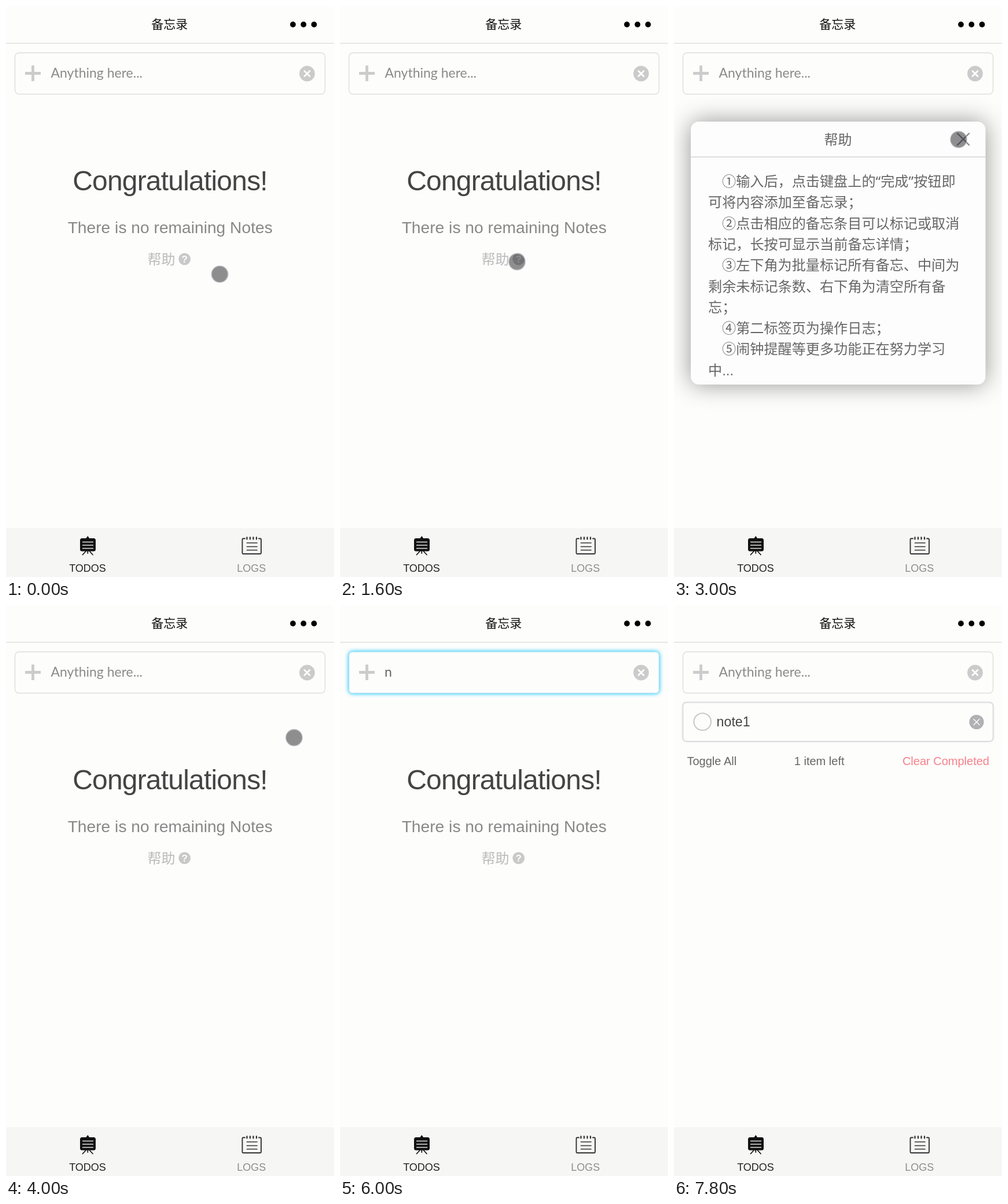
An HTML page for the animation above (8 s loop, 567 by 988 pixels).

```html
<!DOCTYPE html>
<html lang="zh-CN">
<head>
<meta charset="utf-8">
<title>备忘录</title>
<style>
html, body { margin: 0; width: 100%; height: 100%; overflow: hidden; background: #fdfdfc; }
svg { display: block; width: 100vw; height: 100vh; }
text { font-family: "Liberation Sans", Arial, sans-serif; }
.zh { font-family: "Noto Sans CJK SC", "Noto Sans CJK", sans-serif; }
.quote { font-family: "Noto Sans", sans-serif; }
.dots { font-family: "Liberation Sans", sans-serif; }
.field { font: 23px Lato, sans-serif; }
.mid { text-anchor: middle; }
.line { fill: none; stroke-linecap: round; stroke-linejoin: round; }

/* every part shares one 8 s clock with hard steps */
.a { animation: 8s step-end infinite; }
#cursor { animation-name: move; }
#ring { animation-name: ripple; }
#popup { animation-name: popup; }
#glow { animation-name: focus; }
#hint { animation-name: hint; }
#empty { animation-name: empty; }
#list { animation-name: list; }
#caret { animation-name: caret; }
#k1 { animation-name: key1; }
#k2 { animation-name: key2; }
#k3 { animation-name: key3; }
#k4 { animation-name: key4; }

@keyframes move {
  0% { transform: translate(369.5px, 464px); visibility: visible; }
  5% { transform: translate(358px, 459px); }
  7.5% { transform: translate(325px, 448px); }
  10% { transform: translate(304px, 442px); }
  17.5% { transform: translate(306px, 442.5px); }
  25% { transform: translate(330px, 420px); }
  27.5% { transform: translate(477px, 259.5px); }
  30% { transform: translate(509px, 240px); }
  32.5% { transform: translate(505px, 233px); }
  35% { transform: translate(497px, 231px); }
  37.5% { transform: translate(492px, 231px); }
  45% { transform: translate(496px, 230px); }
  47.5% { transform: translate(498px, 229.5px); }
  52.5% { transform: translate(400px, 172px); }
  55% { transform: translate(275.5px, 127.5px); }
  70%, 100% { transform: translate(275.5px, 127.5px); visibility: hidden; }
}
@keyframes ripple {
  0% { opacity: 0; }
  27.5% { opacity: 1; r: 31.5px; transform: translate(305.5px, 441.5px); }
  30% { opacity: .5; r: 39px; }
  32.5% { opacity: 0; }
  52.5% { opacity: 1; r: 31.5px; transform: translate(498px, 229.5px); }
  55% { opacity: .5; r: 39px; }
  57.5% { opacity: 1; r: 31.5px; transform: translate(275.5px, 127.5px); }
  60% { opacity: .5; r: 39px; }
  62.5%, 100% { opacity: 0; }
}
@keyframes popup {
  0% { opacity: 0; }
  22.5% { opacity: .45; }
  25% { opacity: 1; }
  47.5% { opacity: .45; }
  50%, 100% { opacity: 0; }
}
@keyframes focus { 0% { opacity: 0; } 57.5% { opacity: 1; } 97.5%, 100% { opacity: 0; } }
@keyframes hint { 0% { opacity: 1; } 72.5% { opacity: 0; } 95%, 100% { opacity: 1; } }
@keyframes empty { 0% { opacity: 1; } 95%, 100% { opacity: 0; } }
@keyframes list { 0% { opacity: 0; } 95%, 100% { opacity: 1; } }
@keyframes caret {
  0% { opacity: 0; transform: translateX(77px); }
  62.5% { opacity: 1; }
  65% { opacity: 0; }
  67.5% { opacity: 1; }
  72.5% { opacity: 1; transform: translateX(90px); }
  75% { opacity: 0; }
  82.5% { opacity: 1; transform: translateX(103px); }
  85% { transform: translateX(125px); }
  92.5% { transform: translateX(138px); }
  95%, 100% { opacity: 0; }
}
@keyframes key1 { 0% { visibility: hidden; } 72.5% { visibility: visible; } 95%, 100% { visibility: hidden; } }
@keyframes key2 { 0% { visibility: hidden; } 82.5% { visibility: visible; } 95%, 100% { visibility: hidden; } }
@keyframes key3 { 0% { visibility: hidden; } 85% { visibility: visible; } 95%, 100% { visibility: hidden; } }
@keyframes key4 { 0% { visibility: hidden; } 92.5% { visibility: visible; } 95%, 100% { visibility: hidden; } }
</style>
</head>
<body>
<svg viewBox="0 0 567 988">
  <rect width="567" height="988" fill="#fdfdfc"/>

  <!-- header -->
  <text class="zh mid" x="282.8" y="39" font-size="21" fill="#111">备忘录</text>
  <g fill="#000">
    <circle cx="496" cy="32" r="4.9"/>
    <circle cx="514.3" cy="32" r="4.9"/>
    <circle cx="532.5" cy="32" r="4.9"/>
  </g>
  <path d="M0 64.5H567" stroke="#dedede" stroke-width="1.4"/>

  <!-- input -->
  <rect x="15.5" y="81" width="536" height="71.5" rx="7" fill="#fdfdfc" stroke="#dedede" stroke-width="1.4"/>
  <rect id="glow" class="a" x="15.5" y="81" width="536" height="71.5" rx="6" fill="#fdfdfc" stroke="#b4e4f4" stroke-width="1.4" style="filter: drop-shadow(0 0 3.5px #00c4fa)"/>
  <path d="M33 116.5H60M46.5 103V130" stroke="#ccc" stroke-width="4.8"/>
  <text id="hint" class="a field" x="77.5" y="123.5" fill="#8a8a8a">Anything here...</text>
  <text class="field" x="77" y="123.5" fill="#666"><tspan id="k1" class="a">n</tspan><tspan id="k2" class="a">o</tspan><tspan id="k3" class="a">te</tspan><tspan id="k4" class="a">1</tspan></text>
  <rect id="caret" class="a" y="106" width="1.8" height="21" fill="#555"/>
  <circle cx="520.5" cy="117" r="13.4" fill="#cbcbcb"/>
  <path class="line" d="M516 112.5l9 9m0-9l-9 9" stroke="#fff" stroke-width="2.8"/>

  <!-- nothing left -->
  <g id="empty" class="a">
    <text class="mid" x="283.5" y="318.5" font-size="48" letter-spacing="-.8" fill="#444">Congratulations!</text>
    <text class="mid" x="283.7" y="393" font-size="28.2" fill="#888">There is no remaining Notes</text>
    <text class="zh" x="244.5" y="446.5" font-size="24" fill="#bbb">帮助</text>
    <circle cx="308.7" cy="437.8" r="10.4" fill="#c9c9c9"/>
    <text class="mid" x="308.7" y="444" font-size="17" font-weight="bold" fill="#fff">?</text>
  </g>

  <!-- notes -->
  <g id="list" class="a">
    <rect x="15.5" y="168.8" width="536" height="67" rx="6" fill="#fdfdfc" stroke="#d9d9dc" stroke-width="1.5" style="filter: drop-shadow(0 0 1.5px #d4d4dc)"/>
    <circle cx="49.2" cy="202" r="14.8" fill="none" stroke="#c8c8c8" stroke-width="2"/>
    <text x="73.6" y="210" font-size="23.2" fill="#444">note1</text>
    <circle cx="523" cy="202.5" r="12.6" fill="#b1b1b4"/>
    <path class="line" d="M518 197.5l10 10m0-10l-10 10" stroke="#fff" stroke-width="1.3"/>
    <g font-size="20" fill="#666">
      <text x="22.5" y="277">Toggle All</text>
      <text x="207.8" y="277">1 item left</text>
      <text x="545" y="277" text-anchor="end" fill="#f88088">Clear Completed</text>
    </g>
  </g>

  <!-- tab bar -->
  <rect y="904" width="567" height="84" fill="#f6f6f5"/>
  <path d="M0 904.5H567" stroke="#f1f1f0"/>
  <g stroke="#111">
    <rect x="129" y="922" width="25" height="20.5" rx="2.5" fill="#111" stroke-width="2"/>
    <path d="M138.5 921l2.8-4 2.8 4z" fill="#111" stroke="none"/>
    <path class="line" d="M138 943.5l-5.5 6M144.500 943.500l5.500 6M141.300 943v4" stroke-width="1.7"/>
    <path d="M132 927.500H151M132 933H151M132 938.500H151" stroke="#e2e2e2" stroke-width="1.5"/>
  </g>
  <g class="line" stroke="#333" stroke-width="1.900">
    <path d="M413 921.500H410Q408.500 921.500 408.500 923V946.500Q408.500 948 410 948H439.500Q441 948 441 946.500V923Q441 921.500 439.500 921.500H437"/>
    <path d="M416.500 929H434M416.500 935.500H434M416.500 941.500H434" stroke-width="1.700"/>
    <path d="M416.500 919.500v3M422 919.500v3M427.500 919.500v3M433 919.500v3" stroke-width="2.300"/>
  </g>
  <text class="mid" x="141" y="978.5" font-size="18" fill="#222">TODOS</text>
  <text class="mid" x="424.3" y="978.5" font-size="18" fill="#8c8c8c">LOGS</text>

  <!-- help -->
  <g id="popup" class="a">
    <rect x="29" y="200" width="509.500" height="455" rx="14" fill="#fdfdfd" style="filter: drop-shadow(0 0 20px rgba(0,0,0,.42))"/>
    <text class="zh mid" x="283.500" y="239.500" font-size="24" fill="#666">帮助</text>
    <path class="line" d="M490 220.500l20 20m0-20l-20 20" stroke="#8a8a8a" stroke-width="2.400"/>
    <path d="M29 261.300H538.500" stroke="#d4d4d4" stroke-width="1.400"/>
    <g class="zh" font-size="24.15" fill="#666">
      <text class="zh" x="83" y="312">①输入后，点击键盘上的<tspan class="quote">“</tspan>完成<tspan class="quote">”</tspan>按钮即</text>
      <text class="zh" x="59" y="348.3">可将内容添加至备忘录；</text>
      <text class="zh" x="83" y="384.6">②点击相应的备忘条目可以标记或取消</text>
      <text class="zh" x="59" y="420.900">标记，长按可显示当前备忘详情；</text>
      <text class="zh" x="83" y="457.200">③左下角为批量标记所有备忘、中间为</text>
      <text class="zh" x="59" y="493.500">剩余未标记条数、右下角为清空所有备</text>
      <text class="zh" x="59" y="529.800">忘；</text>
      <text class="zh" x="83" y="566.100">④第二标签页为操作日志；</text>
      <text class="zh" x="83" y="602.400">⑤闹钟提醒等更多功能正在努力学习</text>
      <text class="zh" x="59" y="638.700">中<tspan class="dots">...</tspan></text>
    </g>
  </g>

  <!-- pointer -->
  <circle id="ring" class="a" r="31.5" fill="none" stroke="#8dbdf6" stroke-width="3"/>
  <circle id="cursor" class="a" r="14" fill="rgba(20,20,26,.48)" stroke="rgba(170,170,178,.75)" stroke-width="1.5"/>
</svg>
</body>
</html>
```
